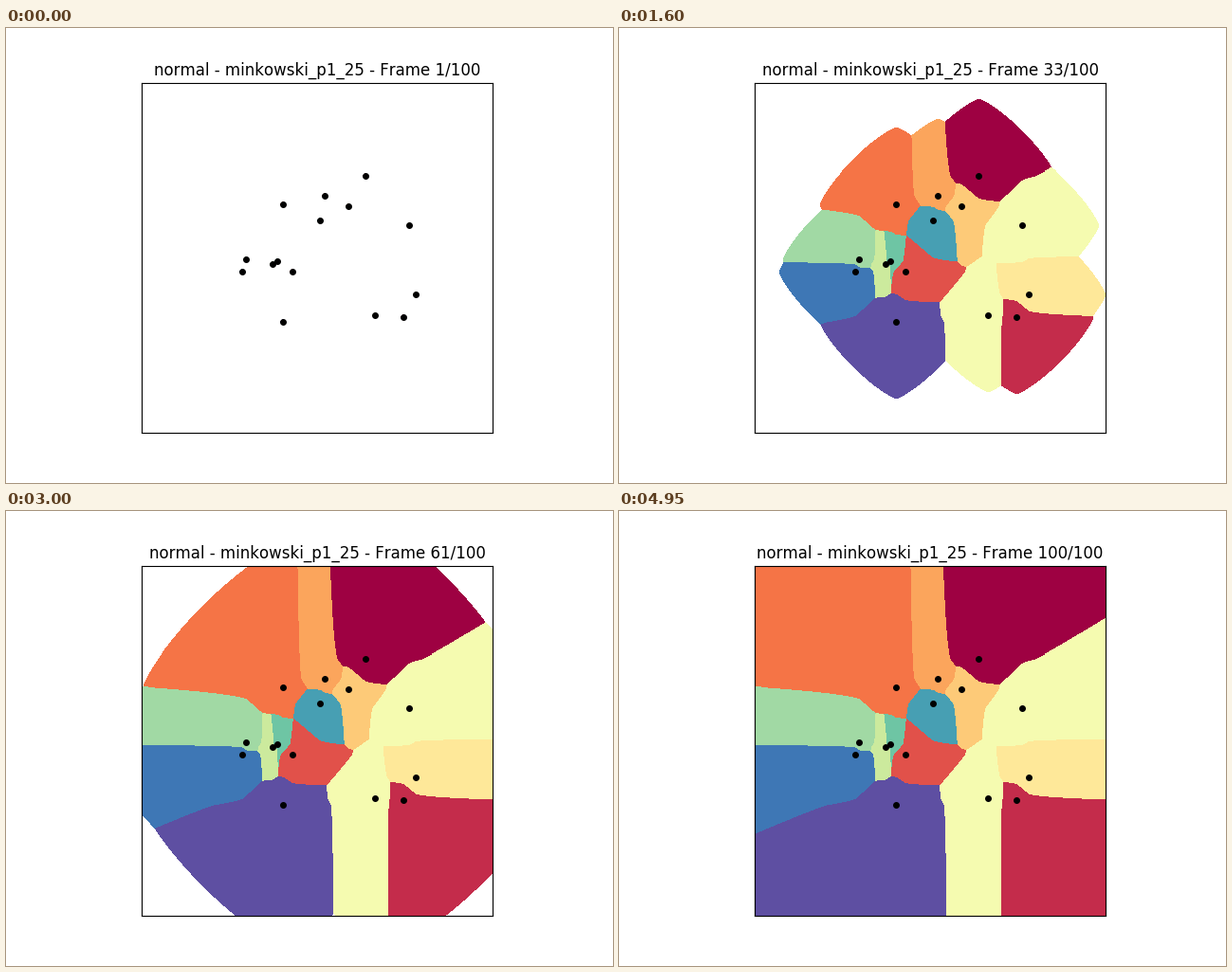
A matplotlib script that plays this animation: 640x480 px, repeating every 5000 ms.

```python
import numpy as np
import matplotlib.pyplot as plt
from matplotlib.animation import FuncAnimation

W, H, DPI = 640, 480, 100
FRAMES, INTERVAL = 100, 50
P = 1.25
START, STEP = 3.5, 2.415  # growth of the cell radius, in pixels

plt.rcParams.update({"font.family": "DejaVu Sans", "text.kerning_factor": 6})

# The key points, in stage pixels with y down; their order sets the colour.
seeds = 0.4 + np.array([
    (379, 156), (419, 305), (302, 257), (292, 186), (336, 177),
    (361, 188), (432, 281), (425, 208), (389, 303), (281, 249),
    (253, 244), (286, 246), (331, 203), (249, 257), (292, 310),
])

colors = plt.get_cmap("Spectral")(np.linspace(0, 1, len(seeds)))[:, :3]
mid = len(seeds) // 2
colors[mid:mid + 2] = colors[mid:mid + 2].mean(axis=0)  # one shared yellow

# Square plot area, centred in the default subplot margins
side = 0.77 * H
left, bottom = 0.5125 * W - side / 2, 0.11 * H
top = H - bottom - side

# Nearest seed and its Minkowski distance for every pixel of the plot
x0, y0 = int(left), int(top)
size = int(np.ceil(side)) + 1
gx, gy = np.meshgrid(x0 + np.arange(size) + 0.5, y0 + np.arange(size) + 0.5)
dist = np.array([(abs(gx - x) ** P + abs(gy - y) ** P) ** (1 / P)
                 for x, y in seeds])
cells = colors[dist.argmin(axis=0)]
reach = dist.min(axis=0)[..., None]

fig = plt.figure(figsize=(W / DPI, H / DPI), dpi=DPI, facecolor="white")
ax = fig.add_axes([left / W, bottom / H, side / W, side / H])
image = ax.imshow(np.ones_like(cells), interpolation="nearest", aspect="auto",
                  extent=(x0, x0 + size, y0 + size, y0))
ax.plot(*seeds.T, "ko", markersize=4)
ax.set(xlim=(left, left + side), ylim=(top + side, top), xticks=[], yticks=[])
title = ax.set_title("", fontsize=12)


def draw(i):
    image.set_data(np.where(reach <= START + STEP * i, cells, 1.0))
    title.set_text(f"normal - minkowski_p1_25 - Frame {i + 1}/{FRAMES}")
    return image, title


anim = FuncAnimation(fig, draw, frames=FRAMES, interval=INTERVAL,
                     repeat=True, repeat_delay=0)
plt.show()
```
